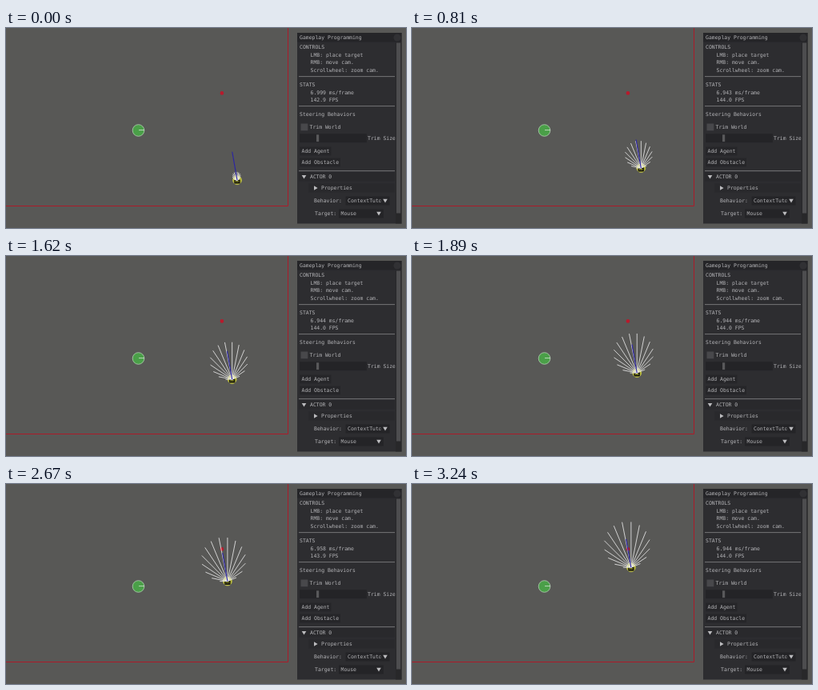
Recreate the animation shown at these times as an HTML page. Size 500 px wide and 250 px high, loop 3.27 s.

```html
<!DOCTYPE html>
<html lang="en">
<head>
<meta charset="utf-8">
<style>
html, body { margin: 0; width: 100%; height: 100%; overflow: hidden; background: #585856; }
svg { display: block; width: 500px; height: 250px; }
text { font: 6.45px "DejaVu Sans Mono", monospace; fill: #b4b4b7; white-space: pre; }
</style>
</head>
<body>
<svg id="stage" viewBox="0 0 500 250">
  <defs>
    <clipPath id="panelClip"><rect x="364" y="6" width="122.5" height="238"/></clipPath>
    <clipPath id="comboClip"><rect x="425" y="208" width="43.5" height="16"/></clipPath>
  </defs>
  <rect width="500" height="250" fill="#585856"/>
  <path d="M352.5 0V222.5H0" fill="none" stroke="#ac1a28"/>
  <circle cx="165.5" cy="128" r="7.3" fill="#4a9f48" stroke="#b4d2b4" stroke-width=".8"/>
  <path d="M166 127.6h7" stroke="#d5e8d5" stroke-width=".8"/>
  <circle cx="269.9" cy="81.4" r="2.3" fill="#b81a2c"/>
  <g id="agent">
    <circle r="5.5" fill="#b4b62e" stroke="#cfd05c" stroke-width=".6"/>
    <path d="M-3 4.2V.2H3V4.2M-1 4.2V1.5M1.2 4.2V1.5M-3 3.6H3" fill="none" stroke="#1c1c10" stroke-width="1.5"/>
    <path id="rays" stroke="#f0f0f0" stroke-width=".8"/>
    <path id="heading" stroke="#2a22a8" stroke-width="1.1"/>
  </g>
  <g id="panel"></g>
</svg>
<script>
const LOOP = 3270, STEP = 30, RAY_COUNT = 32;
const HEADING = -10 * Math.PI / 180;
const $ = id => document.getElementById(id);

// Agent height at even intervals of 540 ms
const SPAN = 540;
const heights = [190.2, 181.5, 168.6, 154.2, 138.1, 120.6, 104.3];

// [start ms, frame time, frames per second]
const stats = [
  [0, '6.999', '142.9'], [270, '6.971', '143.5'], [540, '6.950', '143.9'],
  [780, '6.943', '144.0'], [1080, '6.958', '143.9'], [1410, '6.944', '144.0'],
  [1920, '6.948', '143.9'], [2430, '6.958', '143.9'], [2970, '6.944', '144.0']
];

const rect = (x, y, w, h, fill) => `<rect x="${x}" y="${y}" width="${w}" height="${h}" fill="${fill}"/>`;
const label = (x, mid, str, attrs = '') => `<text x="${x}" y="${mid + 2.4}" ${attrs}>${str}</text>`;
const rule = y => rect(366, y, 120, 0.9, '#7c7c7e');
const arrow = (x, y, turn = 0) =>
  `<path d="M-2.8 -2H2.8L0 2.6Z" fill="#bcbcbf" transform="translate(${x} ${y}) rotate(${turn})"/>`;

function buildPanel() {
  const body = '#2d2d30', dark = '#252528', button = '#262629', frame = '#242427', header = '#29292c';
  $('panel').innerHTML = [
    rect(364, 6, 130.5, 238.5, body),
    rect(364, 6, 130.5, 11.5, dark),
    '<circle cx="489" cy="12" r="4.6" fill="#313134"/>',
    rect(487, 17.5, 7.5, 227, '#28282a'),
    rect(488, 18.5, 5.2, 213, '#4d4d4f'),
    '<g clip-path="url(#panelClip)">',
    label(367, 12, 'Gameplay Programming'),
    label(367, 24, 'CONTROLS'),
    label(380.5, 33.5, 'LMB: place target'),
    label(380.5, 43, 'RMB: move cam.'),
    label(380.5, 52.3, 'Scrollwheel: zoom cam.'),
    rule(60.2),
    label(367, 71, 'STATS'),
    label(380.5, 80.2, '', 'id="frameTime"'),
    label(380.5, 89.8, '', 'id="fps"'),
    rule(97.2),
    label(367, 107.5, 'Steering Behaviors'),
    rect(368.5, 119.5, 8.8, 8.8, '#48484b'),
    label(379.5, 124, 'Trim World'),
    rect(367, 132.3, 84, 10.8, frame),
    rect(388, 133.3, 3.2, 8.8, '#59595b'),
    label(452, 137.7, 'Trim Size'),
    rect(367, 148.5, 39.5, 10.8, button),
    label(369.5, 154, 'Add Agent'),
    rect(367, 162.5, 51, 10.8, button),
    label(369.5, 168, 'Add Obstacle'),
    rule(178.2),
    rect(366, 180.5, 120, 11, header),
    arrow(372.5, 186),
    label(380, 186, 'ACTOR 0'),
    rect(378, 194.5, 108, 11, header),
    arrow(387, 200, -90),
    label(394, 200, 'Properties'),
    label(385, 216, 'Behavior:'),
    rect(424.5, 210.5, 55, 11, frame),
    label(427, 216, 'ContextTutorial', 'clip-path="url(#comboClip)"'),
    arrow(474, 215.8),
    label(386, 232, 'Target:'),
    rect(416, 226.5, 56, 11, frame),
    label(418.5, 232, 'Mouse'),
    arrow(466, 231.8),
    '</g>'
  ].join('');
}

function heightAt(t) {
  const i = Math.min(Math.floor(t / SPAN), heights.length - 2);
  return heights[i] + (heights[i + 1] - heights[i]) * (t / SPAN - i);
}

const spoke = (angle, length) =>
  `M0 0L${(Math.sin(angle) * length).toFixed(2)} ${(-Math.cos(angle) * length).toFixed(2)}`;

// Each ray's length is its alignment with the heading
function fan(reach) {
  let d = '';
  for (let i = 0; i < RAY_COUNT; i++) {
    const angle = i * 2 * Math.PI / RAY_COUNT;
    const weight = Math.cos(angle - HEADING);
    if (weight > 0) d += spoke(angle, reach * weight);
  }
  return d;
}

function draw(t) {
  const y = heightAt(t);
  const x = 289 + (heights[0] - y) * Math.tan(HEADING);
  $('agent').setAttribute('transform', `translate(${x.toFixed(2)} ${y.toFixed(2)})`);
  $('rays').setAttribute('d', fan(62 - 51.5 * Math.exp(-t / 1300)));
  const [, ms, fps] = stats.filter(s => s[0] <= t).pop();
  $('frameTime').textContent = ms + ' ms/frame';
  $('fps').textContent = fps + ' FPS';
}

buildPanel();
$('heading').setAttribute('d', spoke(HEADING, 36));
const start = performance.now();
function tick() {
  const t = (performance.now() - start) % LOOP;
  draw(Math.floor(t / STEP) * STEP);
  requestAnimationFrame(tick);
}
tick();
</script>
</body>
</html>
```
